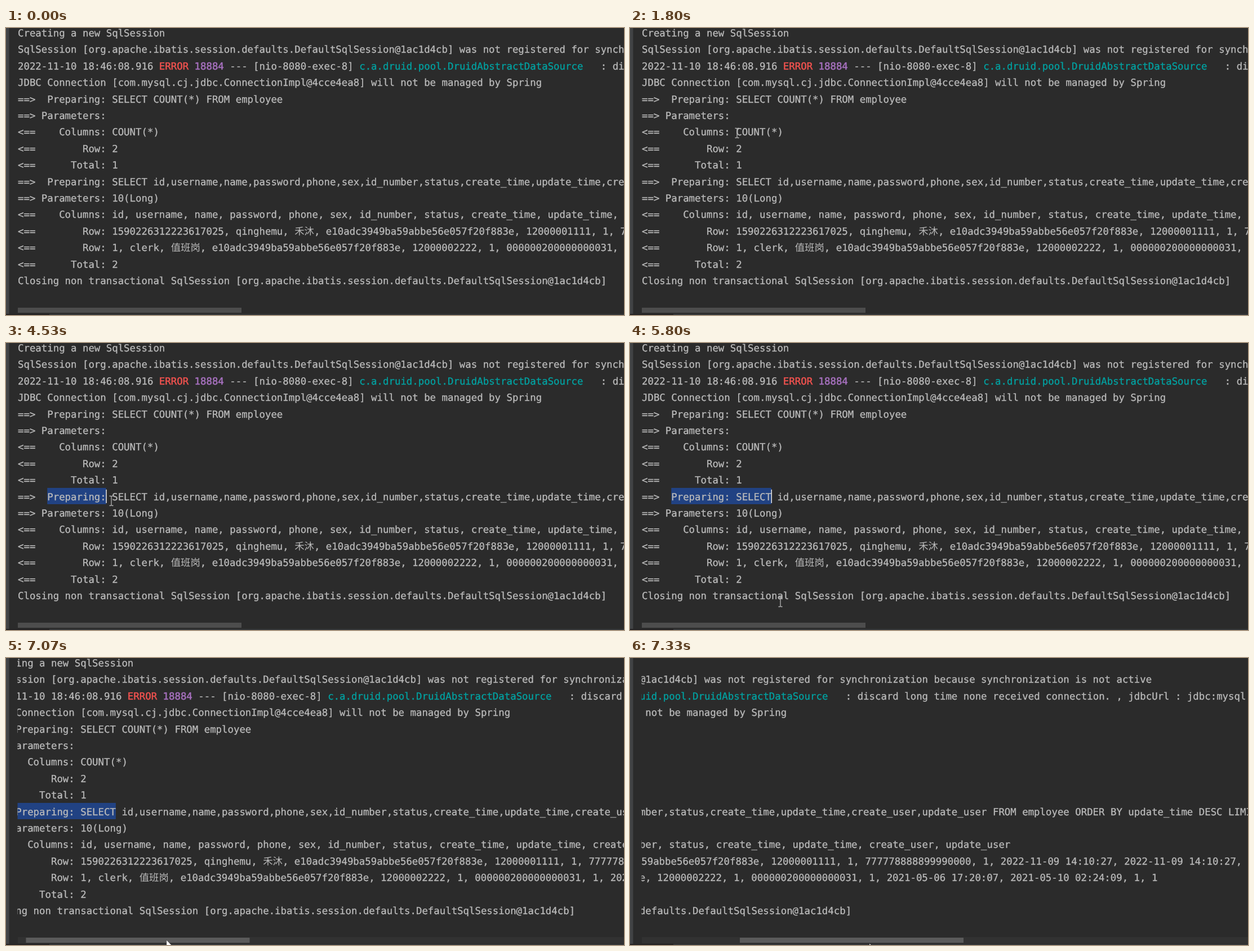
These frames come from a looping animation (1097x511 px, 8 s). An HTML page:

```html
<!DOCTYPE html>
<html lang="en">
<head>
<meta charset="utf-8">
<title>Console log</title>
<style>
html, body { margin: 0; width: 100%; height: 100%; overflow: hidden; background: #2b2b2b; }
svg { display: block; }
text {
  font: 17.36px "DejaVu Sans Mono", "Noto Sans CJK SC", monospace;
  white-space: pre; text-rendering: geometricPrecision;
  fill: #bbbbbb; stroke: #bbbbbb; stroke-width: .3px;
  font-variant-ligatures: none;
}
.error { fill: #f0524f; stroke: #f0524f; stroke-width: .5px; }
.pid { fill: #a771bf; stroke: #a771bf; stroke-width: .5px; }
.logger { fill: #00a3a3; stroke: #00a3a3; }
.han { font-family: "Noto Sans CJK SC", "Noto Sans CJK", sans-serif; font-weight: 300; stroke: none; }
</style>
</head>
<body>
<svg width="1097" height="511" viewBox="0 0 1097 511">
  <rect width="1097" height="511" fill="#2b2b2b"/>
  <rect width="5.5" height="511" fill="#414345"/>
  <svg x="20.5" width="1076.5" height="497">
    <g id="log">
      <rect id="sel" height="29" fill="#214283"/>
      <g id="lines"></g>
      <rect id="caret" width="1.6" height="24" fill="#dddddd"/>
    </g>
  </svg>
  <rect id="track" x="21" y="497" width="1076" height="11" fill="#323232"/>
  <rect id="thumb" x="21" y="498" width="397" height="9"/>
  <rect y="509" width="1097" height="2" fill="#353739"/>
  <rect y="509" width="77" height="2" fill="#252324"/>
  <path id="beam" fill="none" stroke="#b4b4b4" stroke-width="1.3"
    d="M-3.5-8.5H-1.2L0-7.5 1.2-8.5H3.5M0-7.5V7.5M-3.5 8.5H-1.2L0 7.5 1.2 8.5H3.5"/>
  <path id="arrow" fill="#fff" stroke="#222" stroke-width=".5"
    d="M0 0V16.5L3.8 13 6.3 18.6 8.8 17.5 6.4 12H11.6Z"/>
</svg>
<script>
const LOOP = 8000, STEP = 1000 / 15;
const CHAR = 10.45, LINE = 29.4, LEFT = 21, SCROLL = 3.868;

const session = "[org.apache.ibatis.session.defaults.DefaultSqlSession@1ac1d4cb]";
const hash = "e10adc3949ba59abbe56e057f20f883e";
const fields = ["id", "username", "name", "password", "phone", "sex", "id_number", "status",
  "create_time", "update_time", "create_user", "update_user"];
const span = (cls, text) => `<tspan class="${cls}">${text}</tspan>`;
const sent = (label, text) => "==&gt; " + label.padStart(10) + ": " + text;
const got = (label, text) => "&lt;== " + label.padStart(10) + ": " + text;

const lines = [
  "Creating a new SqlSession",
  `SqlSession ${session} was not registered for synchronization because synchronization is not active`,
  `2022-11-10 18:46:08.916 ${span("error", "ERROR")} ${span("pid", "18884")} --- [nio-8080-exec-8] ` +
    span("logger", "c.a.druid.pool.DruidAbstractDataSource") +
    "   : discard long time none received connection. , jdbcUrl : jdbc:mysql://localhost:3306",
  "JDBC Connection [com.mysql.cj.jdbc.ConnectionImpl@4cce4ea8] will not be managed by Spring",
  sent("Preparing", "SELECT COUNT(*) FROM employee"),
  sent("Parameters", ""),
  got("Columns", "COUNT(*)"),
  got("Row", "2"),
  got("Total", "1"),
  sent("Preparing", `SELECT ${fields.join(",")} FROM employee ORDER BY update_time DESC LIMIT ?`),
  sent("Parameters", "10(Long)"),
  got("Columns", fields.join(", ")),
  got("Row", `1590226312223617025, qinghemu, ${span("han", "禾沐")}, ${hash}, 12000001111, 1, ` +
    "777778888899990000, 1, 2022-11-09 14:10:27, 2022-11-09 14:10:27, 1, 1"),
  got("Row", `1, clerk, ${span("han", "值班岗")}, ${hash}, 12000002222, 1, ` +
    "000000200000000031, 1, 2021-05-06 17:20:07, 2021-05-10 02:24:09, 1, 1"),
  got("Total", "2"),
  `Closing non transactional SqlSession ${session}`
];

const el = id => document.getElementById(id);
const [log, sel, caret, track, thumb, beam, arrow] =
  ["log", "sel", "caret", "track", "thumb", "beam", "arrow"].map(el);
el("lines").innerHTML = lines.map((line, i) =>
  `<text x=".5" y="${(15 + LINE * i).toFixed(1)}">${line}</text>`).join("");

// time, x, y of the pointer
const path = [
  [133, 1080, 500], [333, 860, 400], [600, 480, 262], [800, 325, 219], [933, 297, 212],
  [1200, 260, 203], [1533, 205, 190], [1800, 190, 187], [1933, 190, 187],
  [2333, 240, 190], [2667, 275, 193], [2867, 275, 193],
  [3067, 215, 222], [3267, 110, 273], [3400, 77, 286], [3533, 74.5, 287],
  [3600, 74.5, 287], [3733, 74, 282], [3800, 74, 282],
  [4133, 115, 281], [4533, 187, 281], [4667, 212, 281], [4933, 240, 282], [5133, 255, 282],
  [5267, 255, 282], [5533, 259, 355], [5800, 267, 461], [5933, 269, 490],
  [6000, 266, 500], [6133, 252, 503], [6333, 250, 501], [6467, 250, 501], [6733, 250, 503],
  [6933, 250, 503], [7000, 256, 502], [7067, 285, 502], [7200, 360, 505], [7333, 425, 508]
];
// time, distance moved by the scrollbar thumb
const drag = [[6933, 0], [7000, 2], [7067, 14.5], [7133, 52], [7200, 104], [7267, 150], [7333, 174]];
// caret off, caret on
const blinks = [[2933, 3400], [5033, 5533], [6033, 6533], [7033, LOOP]];

function at(table, t, col) {
  const i = table.findIndex(row => row[0] >= t - 1);
  if (i < 0) return table[table.length - 1][col];
  if (i === 0) return table[0][col];
  const a = table[i - 1], b = table[i];
  const k = Math.min(1, (t - a[0]) / (b[0] - a[0]));
  return a[col] + (b[col] - a[col]) * k;
}

const show = (node, on) => node.setAttribute("visibility", on ? "visible" : "hidden");

function select(t) {
  const second = t > 3860;
  const row = second ? 9 : 6, from = second ? 5 : 16, max = second ? 22 : 24;
  const x = at(path, Math.min(t, second ? 5200 : 2800), 1);
  const to = Math.max(from, Math.min(max, Math.floor((x - LEFT) / CHAR)));
  const top = Math.round(-6.2 + LINE * row);
  const active = t > 1990;
  sel.setAttribute("x", from * CHAR + .5);
  sel.setAttribute("y", top);
  sel.setAttribute("width", (to - from) * CHAR);
  caret.setAttribute("x", to * CHAR);
  caret.setAttribute("y", top + 3);
  show(sel, active);
  show(caret, active && !blinks.some(([off, on]) => t > off - 5 && t < on - 5));
}

function draw(ms) {
  const t = Math.floor((ms % LOOP + 4) / STEP) * STEP;
  const x = at(path, t, 1), y = at(path, t, 2);
  const shift = at(drag, t, 1), hover = t > 6990, overBar = t > 5990;
  select(t);
  log.setAttribute("transform", `translate(${-Math.round(shift * SCROLL)} 0)`);
  thumb.setAttribute("x", LEFT + shift);
  thumb.setAttribute("fill", hover ? "#5b5b5b" : "#4d4d4d");
  show(track, hover);
  for (const node of [beam, arrow]) node.setAttribute("transform", `translate(${x} ${y})`);
  show(beam, t > 130 && !overBar);
  show(arrow, overBar);
}

const start = performance.now();
function tick() {
  draw(performance.now() - start);
  requestAnimationFrame(tick);
}
tick();
</script>
</body>
</html>
```
